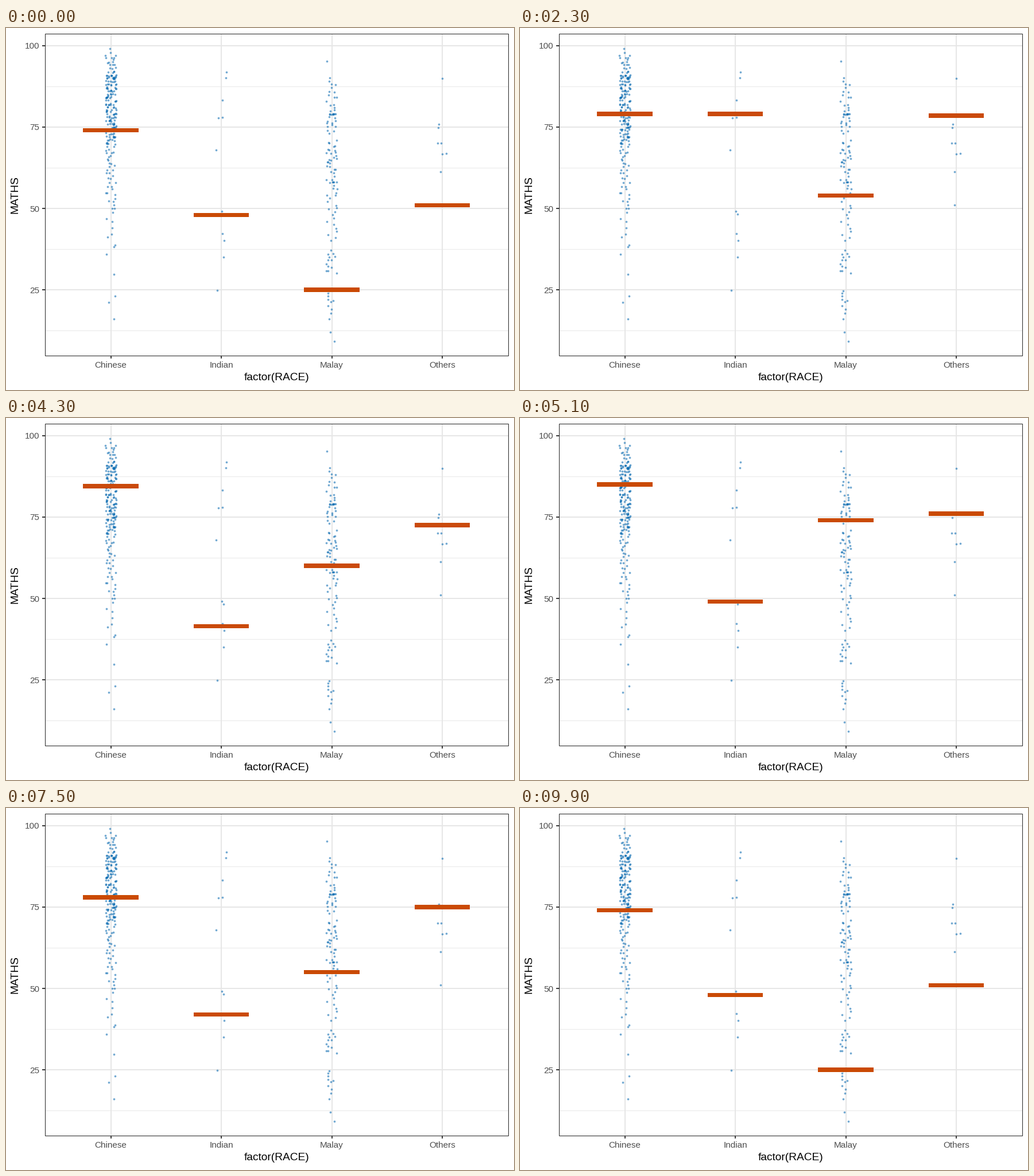
A matplotlib script for the animation above (10000 ms loop, 885x632 px).

```python
import matplotlib.pyplot as plt
import numpy as np
from matplotlib.animation import FuncAnimation
from matplotlib.patches import Rectangle

W, H, DPI = 885, 632, 100
PX = 72 / DPI  # points per pixel
LEFT, RIGHT, TOP, BOTTOM = 67.7, 875.2, 10.3, 571.8
BAR_W, BAR_H = 96.4, 7.5
POINT_BLUE, BAR_HOLD, BAR_MOVE = "#0065ae", "#ca4a04", "#ca4a0c"

plt.rcParams["font.family"] = ["Liberation Sans", "DejaVu Sans"]
GROUPS = ["Chinese", "Indian", "Malay", "Others"]
CENTRES = 182.6 + 192.45 * np.arange(4)


def score_y(score):
    return 30.75 + (100 - np.asarray(score)) * 5.686


# Sampled score per draw, one row for each group
DRAWS = np.array([
    [74, 85, 80, 83, 78, 80, 78, 79, 47, 95, 91, 78, 82,
     85, 80, 78, 70, 80, 86, 78, 81, 85, 87, 85, 76],
    [48, 83, 92, 42, 49, 90, 68, 68, 49, 68, 48, 35, 42,
     49, 48, 49, 68, 42, 48, 42, 68, 40, 68, 68, 78],
    [25, 76, 73, 64, 66, 67, 41, 60, 70, 32, 60, 60, 65,
     74, 18, 63, 65, 35, 62, 55, 60, 58, 16, 60, 35],
    [51, 75, 70, 90, 70, 67, 90, 76, 76, 70, 70, 75, 90,
     76, 90, 67, 70, 70, 61, 75, 70, 67, 67, 67, 67],
]).T

# Small groups: scores and horizontal offsets in pixels
INDIAN = ([91.9, 90.1, 83.2, 78, 77.8, 67.9, 49.1, 48.2, 42.3, 40.1, 35.1,
           24.9], [9.3, 8, 1.7, 1.5, -5.5, -8.7, 1, 4, 2, 4.5, 4, -7])
OTHERS = ([90, 75.8, 74.8, 70.1, 70, 66.7, 66.9, 61.3, 51.1],
          [.5, -6, -6.5, -7.5, -1.5, .5, 7, -2.5, -2.5])

# Large groups: ranks and the scores at those ranks
CHINESE = ([0, 1, 2, 3, 4, 12, 22, 36, 50, 74, 114, 144, 177, 191, 211, 213],
           [16, 21, 23, 30, 36, 49, 56, 64, 70, 74, 80, 85, 90, 91, 97, 99])
MALAY = ([0, 2, 4, 11, 12, 24, 25, 34, 46, 50, 56, 77, 80, 92, 98, 110, 114,
          115],
         [9, 16, 19, 25, 30, 37, 40, 49, 58, 58, 62, 70, 74, 79, 79, 87, 90,
          95])


def crowd(ranks, scores, rng):
    """Whole scores spread along the rank curve, with a small jitter."""
    n = ranks[-1] + 1
    values = np.round(np.interp(np.arange(n), ranks, scores))
    return values + rng.uniform(-.3, .3, n), rng.uniform(-9.6, 9.6, n)


fig = plt.figure(figsize=(W / DPI, H / DPI), dpi=DPI, facecolor="white")
ax = fig.add_axes([0, 0, 1, 1])
ax.set(xlim=(0, W), ylim=(H, 0))
ax.axis("off")


def line(xs, ys, color, width, z):
    ax.plot(xs, ys, color=color, lw=width * PX, zorder=z,
            solid_capstyle="butt")


def label(x, y, text, size, color, **kw):
    ax.text(x, y, text, fontsize=size * PX, color=color, **kw)


# Grid, ticks and labels
for y in score_y(np.arange(87.5, 0, -25)):
    line([LEFT, RIGHT], [y, y], "#ebebeb", 1.1, 1)
for score in range(100, 0, -25):
    y = score_y(score)
    line([LEFT, RIGHT], [y, y], "#e6e6e6", 2, 1)
    line([LEFT - 4.9, LEFT], [y, y], "#333333", 1.9, 4)
    label(58.3, y + 5.5, str(score), 15.3, "#4d4d4d", ha="right")
for x, name in zip(CENTRES, GROUPS):
    line([x, x], [TOP, BOTTOM], "#e6e6e6", 2, 1)
    line([x, x], [BOTTOM, BOTTOM + 4.9], "#333333", 1.9, 4)
    label(x, 592.6, name, 15.3, "#4d4d4d", ha="center")
label(471.3, 615, "factor(RACE)", 19.1, "black", ha="center")
label(24, 291, "MATHS", 19.1, "black", rotation=90, ha="right", va="center")

rng = np.random.default_rng(7)
points = [crowd(*CHINESE, rng), INDIAN, crowd(*MALAY, rng), OTHERS]
for x, (scores, offsets) in zip(CENTRES, points):
    ax.scatter(x + np.array(offsets), score_y(scores), s=(3.7 * PX) ** 2,
               color=POINT_BLUE, alpha=.55, linewidths=0, zorder=2)

bars = [ax.add_patch(Rectangle((x - BAR_W / 2, 0), BAR_W, BAR_H, lw=0,
                               zorder=3)) for x in CENTRES]
ax.add_patch(Rectangle((LEFT, TOP), RIGHT - LEFT, BOTTOM - TOP, fill=False,
                       ec="#333333", lw=1.1 * PX, zorder=5))


def update(frame):
    # Three held steps and one halfway step per draw; one draw is a step short
    draw, step = divmod(frame + (frame >= 50), 4)
    moving = step == 3
    scores = DRAWS[draw % len(DRAWS)]
    if moving:
        scores = (scores + DRAWS[(draw + 1) % len(DRAWS)]) / 2
    for bar, y in zip(bars, score_y(scores)):
        bar.set_y(y - BAR_H / 2)
        bar.set_facecolor(BAR_MOVE if moving else BAR_HOLD)
    return bars


anim = FuncAnimation(fig, update, frames=100, interval=100, repeat=True,
                     repeat_delay=0)
plt.show()
```
